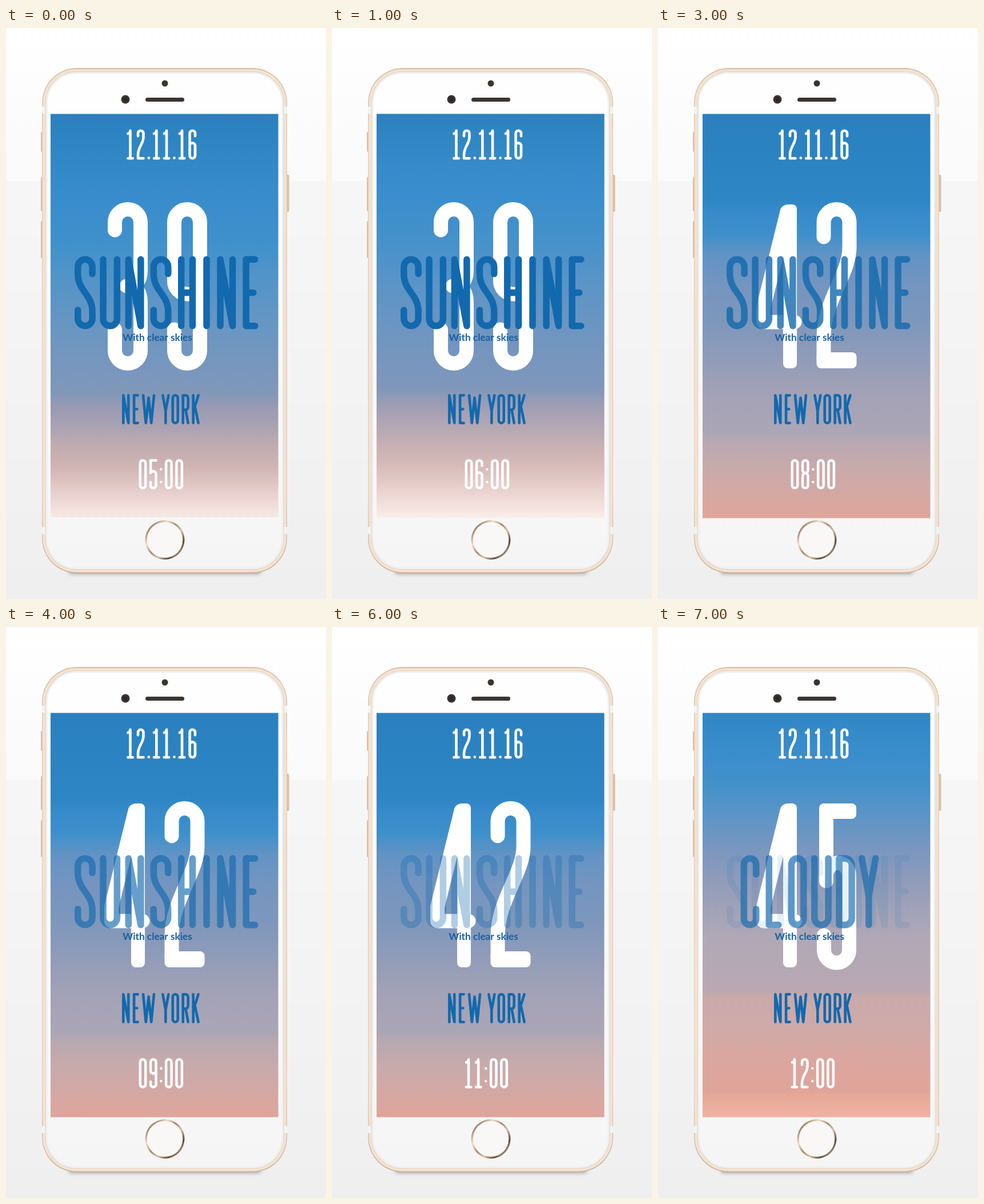
Recreate the animation shown at these times as an HTML page with a canvas. Size 560 px wide and 1000 px high, loop 8000 ms.

```html
<!DOCTYPE html>
<html lang="en">
<head>
<meta charset="utf-8">
<title>Weather phone</title>
<style>
html, body { margin: 0; width: 100%; height: 100%; overflow: hidden; background: #f4f4f4; }
canvas { display: block; }
</style>
</head>
<body>
<canvas id="stage" width="560" height="1000" role="img" aria-label="Hourly weather on a phone: New York, sunshine turning cloudy, with clear skies"></canvas>
<script>
const ctx = document.getElementById('stage').getContext('2d');
const STEP = 1000, STEPS = 8;
const BLUE = '#1269ae';

// Skies: colour stops as "y colour" pairs
const SKIES = {
  early: '150 #2b80be 220 #3087c4 290 #388ccb 375 #3f91cc 440 #5394c8 520 #6796c3 600 #7996bd 640 #8198b8 665 #9a9ab3 700 #aaa3b3 730 #c0abb1 770 #d0b5b3 805 #e3cac7 857 #f8e9e5',
  dawn: '150 #2c82c0 235 #398ccb 310 #3d90cc 380 #4e92c9 450 #6094c5 545 #7495bf 630 #7f97ba 650 #9c9cb5 700 #bfadb4 725 #cab2b4 760 #dcc0bc 800 #ebd2cd 858 #fcf0ec',
  morning: '150 #2a80bf 300 #2e86c4 325 #378bca 362 #3e90cb 400 #6393c4 450 #7495c0 510 #7c97bc 560 #8a9aba 605 #999eb7 650 #a5a2b6 710 #aaa6b6 725 #b8a8b1 770 #c8aaac 810 #d3a8a4 858 #dfa59b',
  noon: '150 #3086c4 225 #3a8ecc 280 #4491ca 340 #6095c6 400 #7e97be 450 #929cb9 500 #a2a3b8 545 #b0a8b7 638 #b9a8b1 648 #c9a9aa 700 #cfaaa8 760 #dba69e 812 #dfa49a 822 #e8a998 858 #efb2a2'
};

// Condensed stroke lettering: [width, path, side bearing], 46 units tall
const GLYPHS = {
  '0': [9, 'M0 4.5a4.5 4.5 0 0 1 9 0V41.5a4.5 4.5 0 0 1-9 0Z'],
  '1': [8, 'M0 5Q4 4 4 0V46M0 46H8'],
  '2': [9, 'M0 9V4.5a4.5 4.5 0 0 1 9 0V11C9 22 0 27 0 40V46H9'],
  '5': [9, 'M9 0H0V21Q1 18 4.5 18a4.5 5 0 0 1 4.5 5V41.5a4.5 4.5 0 0 1-9 0V36'],
  '6': [9, 'M9 9V4.5a4.5 4.5 0 0 0-9 0V41.5a4.5 4.5 0 0 0 9 0V25a4.5 4.5 0 0 0-9 0'],
  '7': [9, 'M0 0H9V6L3 46'],
  '8': [9, 'M4.5 21Q0 21 0 15V4.5a4.5 4.5 0 0 1 9 0V15Q9 21 4.5 21Q0 21 0 28V41.5a4.5 4.5 0 0 0 9 0V28Q9 21 4.5 21'],
  '9': [9, 'M0 37V41.5a4.5 4.5 0 0 0 9 0V4.5a4.5 4.5 0 0 0-9 0V19a4.5 4.5 0 0 0 9 0'],
  ':': [0, 'M0 15h.01M0 36h.01'],
  '.': [0, 'M0 45.5h.01'],
  ' ': [-1, ''],
  C: [8.5, 'M8.5 11V4.3a4.25 4.3 0 0 0-8.5 0V41.7a4.25 4.3 0 0 0 8.5 0V35'],
  D: [8.7, 'M0 0H4.2a4.5 4.5 0 0 1 4.5 4.5V41.5a4.5 4.5 0 0 1-4.5 4.5H0Z'],
  E: [6.2, 'M6.2 0H0V46H6.2M0 23H5', .4],
  H: [7.8, 'M0 0V46M7.8 0V46M0 23H7.8', .6],
  I: [0, 'M0 0V46', .6],
  K: [8.5, 'M0 0V46M8.5 0L0 27M3 20L8.5 46'],
  L: [6.5, 'M0 0V46H6.5', .4],
  N: [8.5, 'M0 46V0L8.5 46V0', .4],
  O: [8.5, 'M0 4.3a4.25 4.3 0 0 1 8.5 0V41.7a4.25 4.3 0 0 1-8.5 0Z'],
  R: [8.5, 'M0 46V0H4.2a4.3 4.5 0 0 1 4.3 4.5V19.5a4.3 4.5 0 0 1-4.3 4.5H0M4.5 24L8.5 46'],
  S: [10, 'M10 10V5a5 5 0 0 0-10 0V10C0 22 10 24 10 36V41a5 5 0 0 1-10 0V35'],
  U: [9.6, 'M0 0V41.2a4.8 4.8 0 0 0 9.6 0V0', -1],
  W: [18, 'M0 0L4.5 46L9 4L13.5 46L18 0'],
  Y: [9.5, 'M0 0L4.75 26L9.5 0M4.75 26V46', -1.5]
};

// Large temperature digits in stage coordinates: stroke plus squared ends
const FOUR = 'M226 322L184.5 490V515H239';
const FOUR_STEM = [219, 309, 24, 287];
const TEMPS = {
  39: {
    path: 'M190.5 354V340A22.5 22.5 0 0 1 235.5 340V425Q235.5 452 211 452Q235.5 452 235.5 480V565A22.5 22.5 0 0 1 190.5 565V528' +
      'M339.5 466H317A22.5 22.5 0 0 1 294.5 443V340A22.5 22.5 0 0 1 339.5 340V565A22.5 22.5 0 0 1 294.5 565V528',
    boxes: []
  },
  42: {
    path: FOUR + 'M290 366V340A22.5 22.5 0 0 1 335 340V385C335 430 290 480 290 540V578',
    boxes: [FOUR_STEM, [277.5, 568, 70, 28]]
  },
  45: {
    path: FOUR + 'M294.5 323V445M294.5 436A20 23 0 0 1 334.5 436V566A22 22 0 0 1 290.5 566V540',
    boxes: [FOUR_STEM, [282, 309, 65, 27]]
  }
};

function linear(x0, y0, x1, y1, stops) {
  const g = ctx.createLinearGradient(x0, y0, x1, y1);
  stops.forEach(([p, c]) => g.addColorStop(p, c));
  return g;
}

function box(x, y, w, h, r, fill) {
  ctx.beginPath();
  ctx.roundRect(x, y, w, h, r);
  ctx.fillStyle = fill;
  ctx.fill();
}

function disc(x, y, r, fill) {
  ctx.beginPath();
  ctx.arc(x, y, r, 0, Math.PI * 2);
  ctx.fillStyle = fill;
  ctx.fill();
}

function lettering(str, left, top, height, weight, gap, color, alpha = 1) {
  const s = (height - weight) / 46, line = new Path2D();
  let x = left + weight / 2;
  [...str].forEach((ch, i) => {
    const [w, d, side = 0] = GLYPHS[ch];
    if (i) x += side * s;
    line.addPath(new Path2D(d), new DOMMatrix([s, 0, 0, s, x, top + weight / 2]));
    x += (w + side) * s + weight + gap;
  });
  ctx.globalAlpha = alpha;
  ctx.lineWidth = weight;
  ctx.strokeStyle = color;
  ctx.stroke(line);
  ctx.globalAlpha = 1;
}

function backdrop() {
  ctx.fillStyle = linear(0, 0, 0, 268, [[0, '#ffffff'], [1, '#fafafa']]);
  ctx.fillRect(0, 0, 560, 268);
  for (let i = 0; i < 8; i++) {
    const v = 246 - i;
    ctx.fillStyle = `rgb(${v},${v},${v})`;
    ctx.fillRect(0, 268 + i * 97, 560, 97);
  }
}

function phone() {
  ctx.save();
  ctx.shadowColor = 'rgba(0,0,0,.35)';
  ctx.shadowBlur = 6;
  ctx.shadowOffsetY = 2;
  box(110, 944, 336, 10, 5, '#ccc');
  ctx.restore();

  const metal = linear(0, 70, 0, 955, [[0, '#d9bda2'], [.15, '#e6cfb9'], [.85, '#e6cfb9'], [1, '#cdb49b']]);
  [[61, 182, 35], [61, 261, 60], [61, 338, 65], [490, 257, 65]].forEach(([x, y, h]) => box(x, y, 5.5, h, 2, '#d8bfa8'));
  box(63, 70, 429, 885, 61, metal);
  box(64.5, 72, 426, 881, 59, '#f5e3d2');
  [138, 874].forEach(y => {
    box(63, y, 8, 12, 0, '#f3f3f3');
    box(484, y, 8, 12, 0, '#f3f3f3');
  });
  box(68.5, 76, 418, 873, 55, '#e3d2c2');
  box(69.5, 77, 416, 871, 54, '#efefef');
  box(72.5, 80, 410, 865, 51, linear(0, 80, 0, 945, [[0, '#fefefe'], [.5, '#fcfcfc'], [1, '#f5f5f5']]));

  disc(278, 97, 5.5, '#3b3432');
  disc(209, 125, 7.5, '#3b3432');
  disc(209, 125, 4, '#2c2829');
  box(244, 122, 68, 7, 3.5, '#3b3432');

  disc(278, 896.5, 34.5, linear(250, 872, 306, 921,
    [[0, '#8c7358'], [.25, '#f0dfca'], [.45, '#a98a69'], [.65, '#d8bd9c'], [.85, '#5c4936'], [1, '#b79b7c']]));
  disc(278, 896.5, 31.3, '#f9f8f7');
}

function sky(name, alpha = 1) {
  const parts = SKIES[name].split(' '), stops = [];
  const bottom = name === 'early' ? 857 : 858.5;
  for (let i = 0; i < parts.length; i += 2) stops.push([(parts[i] - 150) / 708, parts[i + 1]]);
  ctx.globalAlpha = alpha;
  ctx.fillStyle = linear(0, 150, 0, 858, stops);
  ctx.fillRect(78, 150.5, 398.5, bottom - 150.5);
  ctx.globalAlpha = 1;
}

function temperature(value) {
  const { path, boxes } = TEMPS[value];
  ctx.lineWidth = 25;
  ctx.strokeStyle = '#fff';
  ctx.stroke(new Path2D(path));
  boxes.forEach(b => box(...b, 8, '#fff'));
}

function draw(step) {
  backdrop();
  phone();

  if (step < 2) sky('early');
  if (step === 1) sky('dawn', .5);
  if (step === 2) sky('dawn');
  if (step > 2) sky(step < 7 ? 'morning' : 'noon');

  ctx.lineCap = ctx.lineJoin = 'round';
  lettering('12.11.16', 211, 177.5, 53, 4.6, 4.7, '#fff');
  temperature(step < 3 ? 39 : step < 7 ? 42 : 45);

  const sun = step < 3 ? 1 : step < 7 ? .8 - (step - 3) * .155 : .1;
  lettering('SUNSHINE', 120, 399.5, 128, 11.5, 10, BLUE, sun);
  if (step === 7) lettering('CLOUDY', 144.5, 399.5, 128, 11.5, 10, BLUE, .65);

  ctx.font = '700 17.2px Lato, sans-serif';
  ctx.textAlign = 'center';
  ctx.fillStyle = '#17609f';
  ctx.fillText('With clear skies', 265, 548);

  lettering('NEW YORK', 203, 641, 53, 4.6, 4.4, BLUE);
  lettering(String(5 + step).padStart(2, '0') + ':00', 232.5, 755, 53, 4.5, 4.3, '#fff');
}

function tick(now) {
  draw(Math.floor(now / STEP) % STEPS);
  requestAnimationFrame(tick);
}
draw(0);
requestAnimationFrame(tick);
</script>
</body>
</html>
```
